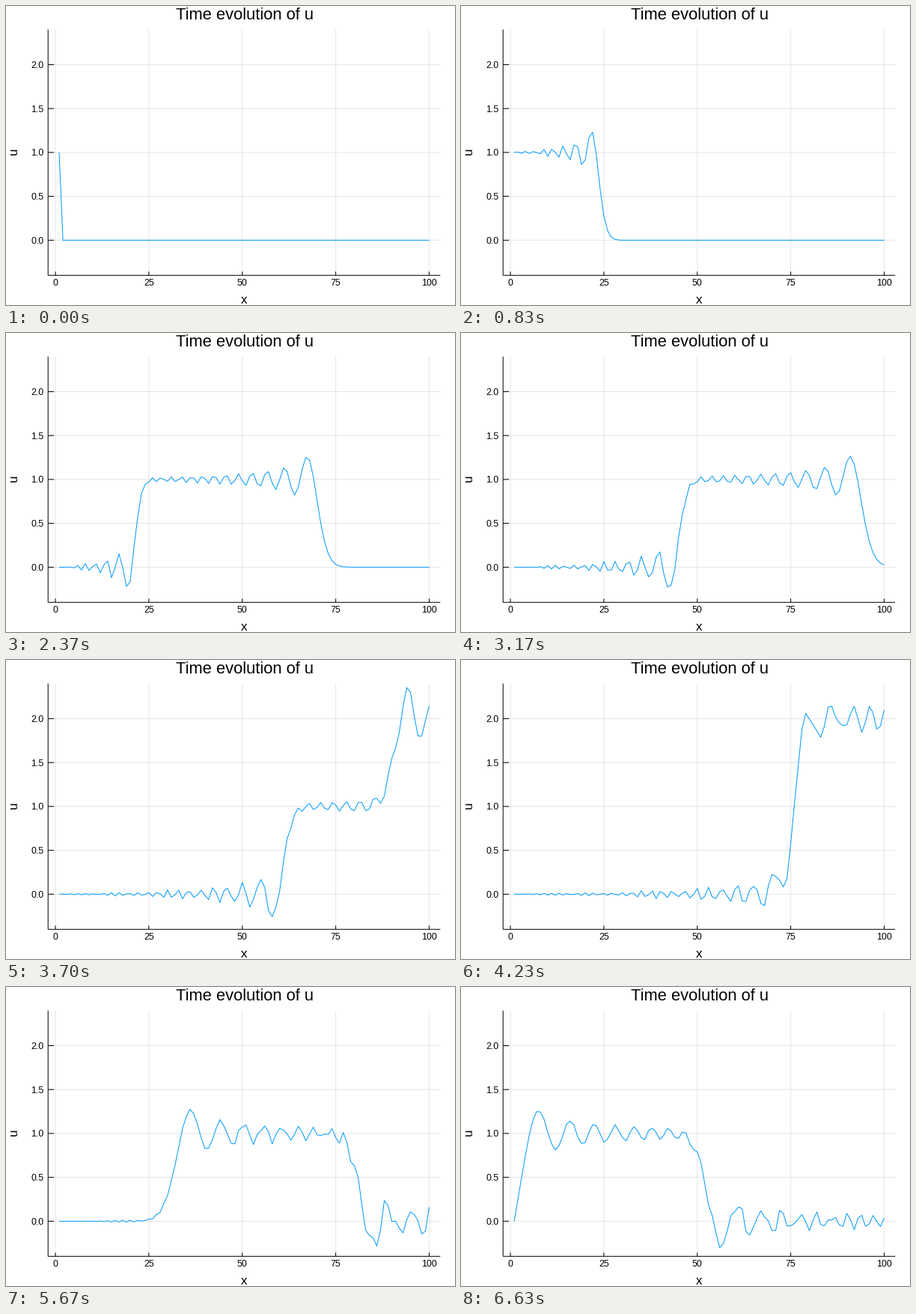
A matplotlib script that plays this animation: 600x400 px, repeating every 6.66 s.

```python
import numpy as np
import matplotlib.pyplot as plt
from matplotlib.animation import FuncAnimation
from matplotlib.lines import Line2D

W, H, DPI = 600, 400, 100
PX = 72 / DPI                      # one pixel in points
FRAMES, LOOP_MS = 200, 6660
CELLS, STEPS_PER_FRAME = 100, 2
COURANT, PULSE_STEPS = 0.5, 100
LEFT, RIGHT, TOP, BOTTOM = 56.2, 580.3, 31.5, 360.3
XLIM, YLIM = (-1.97, 102.97), (-0.4, 2.4)
TICK = 0.015                       # tick length as a share of the axis

plt.rcParams["path.snap"] = False


def simulate():
    """Leapfrog wave equation: pulse driven on the left, free end on the right."""
    u = np.zeros((FRAMES * STEPS_PER_FRAME, CELLS))
    u[:PULSE_STEPS, 0] = 1
    for n in range(2, len(u)):
        now = u[n - 1]
        right = np.append(now[2:], now[-1])
        lap = right - 2 * now[1:] + now[:-1]
        u[n, 1:] = 2 * now[1:] - u[n - 2, 1:] + COURANT ** 2 * lap
    return u[::STEPS_PER_FRAME]


def x_px(x):
    return LEFT + (x - XLIM[0]) / (XLIM[1] - XLIM[0]) * (RIGHT - LEFT)


def y_px(y):
    return BOTTOM - (y - YLIM[0]) / (YLIM[1] - YLIM[0]) * (BOTTOM - TOP)


def put(x, y, text, size, **kw):
    style = dict(ha="center", va="baseline", family="Liberation Sans")
    fig.text(x / W, 1 - y / H, text, fontsize=size * PX, **{**style, **kw})


def stroke(x0, y0, x1, y1, alpha=1):
    fig.add_artist(Line2D([x0 / W, x1 / W], [1 - y0 / H, 1 - y1 / H],
                          color="black", alpha=alpha, linewidth=PX,
                          solid_capstyle="butt"))


fig = plt.figure(figsize=(W / DPI, H / DPI), dpi=DPI, facecolor="white")

for tick in range(0, 101, 25):
    x = x_px(tick)
    stroke(x, TOP, x, BOTTOM, alpha=0.1)
    stroke(x, BOTTOM, x, BOTTOM - TICK * (BOTTOM - TOP))
    put(x, 374.3, f"{tick}", 12.4)
for tick in np.arange(0, 2.1, 0.5):
    y = y_px(tick)
    stroke(LEFT, y, RIGHT, y, alpha=0.1)
    stroke(LEFT, y, LEFT + TICK * (RIGHT - LEFT), y)
    put(50.8, y + 4.4, f"{tick:.1f}", 12.4, ha="right")
stroke(LEFT, TOP, LEFT, BOTTOM)
stroke(LEFT, BOTTOM, RIGHT, BOTTOM)

put(319.2, 18, "Time evolution of u", 21.9)
put(318, 398, "x", 17)
put(18, 194.5, "u", 17, rotation=90, ha="right", va="center")

ax = fig.add_axes([LEFT / W, 1 - BOTTOM / H,
                   (RIGHT - LEFT) / W, (BOTTOM - TOP) / H], zorder=5)
ax.set(xlim=XLIM, ylim=YLIM)
ax.axis("off")

wave = simulate()
line, = ax.plot(np.arange(1, CELLS + 1), wave[0], color="#009AFA", linewidth=PX,
                solid_capstyle="butt")


def draw(i):
    line.set_ydata(wave[i])
    return line,


anim = FuncAnimation(fig, draw, frames=FRAMES, interval=LOOP_MS / FRAMES,
                     repeat=True, repeat_delay=0, blit=False)
plt.show()
```
